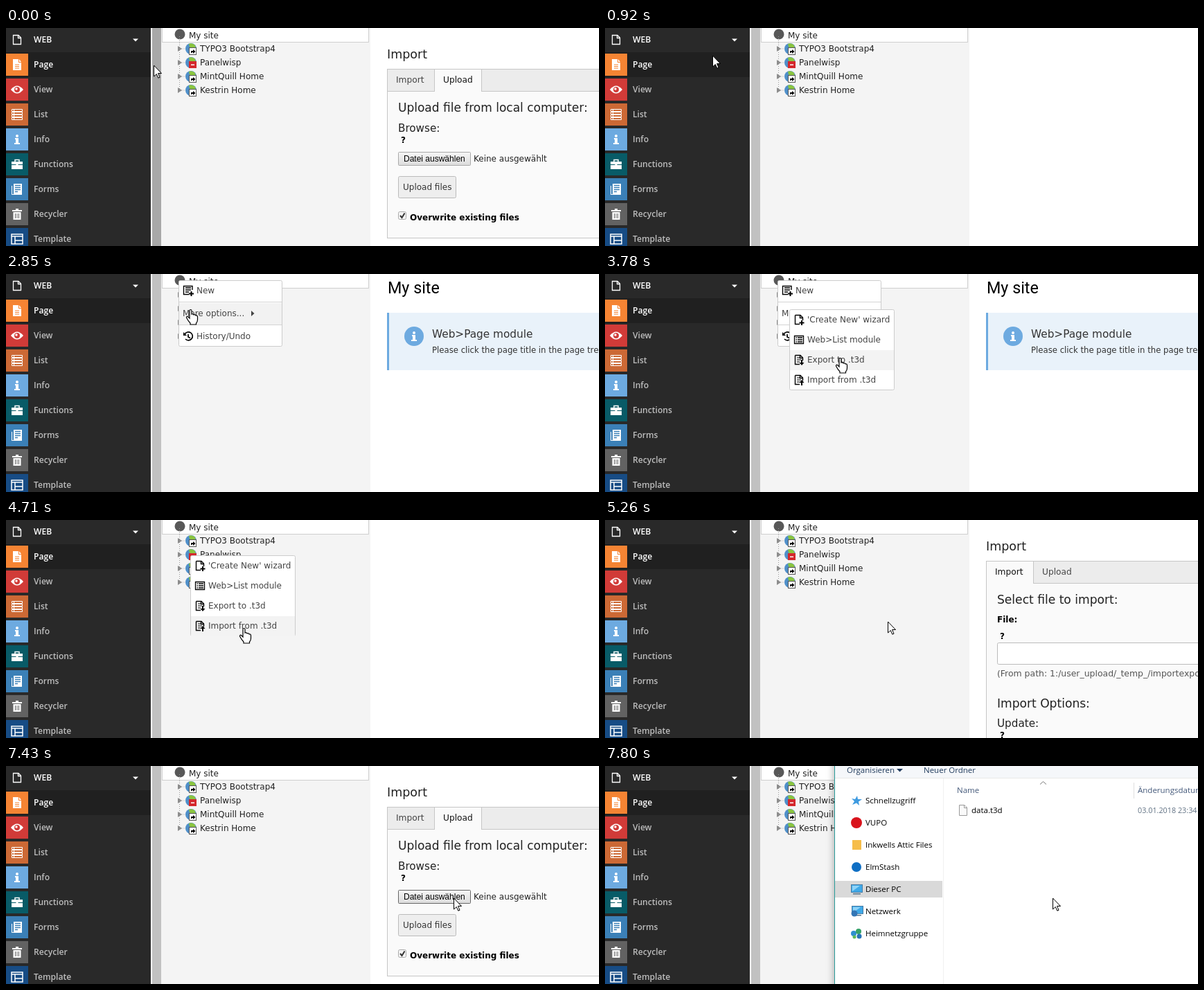
Animation, 856 px wide and 315 px high, one loop 8000 ms. Source, as an HTML page:

```html
<!DOCTYPE html>
<html lang="en">
<head>
<meta charset="utf-8">
<title>Import walkthrough</title>
<style>
  html, body { margin: 0; width: 100%; height: 100%; overflow: hidden; background: #fff; }
  svg { display: block; }
  text { white-space: pre; }
</style>
</head>
<body>
<svg id="stage" width="856" height="315" viewBox="0 0 856 315"></svg>
<script>
const LOOP = 8000;
const BODY = "'DejaVu Sans', sans-serif";
const SANS = "'Open Sans', 'Noto Sans', sans-serif";
const ARIAL = "'Liberation Sans', sans-serif";
const HEAD = "Roboto, sans-serif";

// Markup helpers; text is placed by its left edge and vertical middle.
const text = (x, cy, str, { size = 12, fill = '#222', weight = 400, font = BODY } = {}) =>
  `<text x="${x}" y="${Math.round(cy + size * 0.36)}" font-size="${size}" fill="${fill}" font-weight="${weight}" font-family="${font}">${str}</text>`;
const rect = (x, y, w, h, fill, extra = '') =>
  `<rect x="${x}" y="${y}" width="${w}" height="${h}" fill="${fill}" ${extra}/>`;
const box = (x, y, w, h, fill, stroke, r = 0) =>
  rect(x + 0.5, y + 0.5, w - 1, h - 1, fill, `stroke="${stroke}" rx="${r}"`);
const circle = (x, y, r, fill) => `<circle cx="${x}" cy="${y}" r="${r}" fill="${fill}"/>`;
const path = (d, fill = 'none', stroke = 'none', width = 1) =>
  `<path d="${d}" fill="${fill}" stroke="${stroke}" stroke-width="${width}"/>`;
const at = (x, y, content) => `<g transform="translate(${x} ${y})">${content}</g>`;
const layer = (id, content) => `<g id="${id}">${content}</g>`;

// Module menu: label, tile colour, icon drawn around its centre.
const infoGlyph = circle(0, -5, 2, '#fff') + path('M-3-2H2V5H4V7H-4V5H-2V0H-3Z', '#fff');
const modules = [
  ['Page', '#f58433', path('M-6-8H2V-3H6V8H-6ZM3-8L6-4H3Z', '#fff') + path('M-3 0H3M-3 2.5H3M-3 5H3', 'none', '#f58433')],
  ['View', '#d13b38', path('M-9 0Q0-11 9 0Q0 11-9 0Z', '#fff') + circle(0, 0, 4, '#d13b38') + circle(-1, -1, 1.7, '#fff')],
  ['List', '#cc6935', [-7.5, -3.5, 0.5, 4.5].map(y => path(`M-7.5 ${y}h15v3h-15zM-4.5 ${y}v3`, 'none', '#fff')).join('')],
  ['Info', '#6daae0', infoGlyph],
  ['Functions', '#085b67', rect(-8, -4, 16, 4, '#fff') + rect(-8, 1, 16, 6, '#fff') + path('M-3-4V-6.5H3V-4', 'none', '#fff', 1.5) + rect(-1.5, -1, 3, 3, '#fff')],
  ['Forms', '#3b80b7', path('M-5-8H7V8H-8V-5H-7V7H-5Z', '#fff') + path('M-3-5.5H5M-3-2.5H5M-3 .5H5M-3 3.5H1', 'none', '#3b80b7', 1.3)],
  ['Recycler', '#626262', path('M-7-6H-2V-8H2V-6H7V-4H-7ZM-5.5-3H5.5V8H-5.5Z', '#fff') + path('M-2.5-1V6M0-1V6M2.5-1V6', 'none', '#626262')],
  ['Template', '#174c85', path('M-8-7H8V7H-8ZM-8-4H8M-3-4V7M-3 2H8', 'none', '#fff', 1.5)],
];
const moduleLabel = (cy, str, fill) => text(40, cy, str, { size: 12.1, fill, weight: 600, font: SANS });
const sidebar = () =>
  rect(0, 0, 209, 315, '#292929') + rect(0, 35, 209, 36, '#202020') +
  path('M10.5 10.5H18L21.5 14V23.5H10.5ZM17.5 10.5V14.5H21.5', 'none', '#fff', 1.3) +
  moduleLabel(17, 'WEB', '#fff') + path('M183 15.5H191L187 19.5Z', '#fff') +
  modules.map(([label, color, icon], i) => {
    const cy = 53 + 36 * i;
    return rect(0, cy - 16, 32, 32, color) + at(16, cy, icon) + moduleLabel(cy, label, i ? '#bdbdbd' : '#fff');
  }).join('');

const treeNode = (label, i) => {
  const cy = 30 + 20 * i, hidden = i === 1;
  return `<path d="M250.5 ${cy - 18}V${cy}H260" fill="none" stroke="#999" stroke-dasharray="1 2"/>` +
    path(`M248 ${cy - 4}L254 ${cy}L248 ${cy + 4}Z`, '#8c8c8c') +
    at(267, cy, circle(0, 0, 8, '#4f8fc9') + path('M-3-7Q2-9 6-5L7 0H1L-2-3Z', '#8bc53f') +
      (hidden
        ? rect(-3, -2, 11, 10, '#d4282d') + rect(0, 2.5, 5, 1.5, '#fff')
        : box(-3, -2, 11, 11, '#fff', '#555') + path('M0 6V3H3V1L6.5 4 3 7V5H1.5V6Z', '#000'))) +
    text(280, cy, label);
};
const tree = () =>
  rect(224, 0, 302, 315, '#f4f4f4') + box(225, -1, 299, 22, '#fff', '#cfcfcf') +
  circle(251, 9, 7.5, '#585858') + text(264, 10.5, 'My site') +
  ['TYPO3 Bootstrap4', 'Panelwisp', 'MintQuill Home', 'Kestrin Home'].map(treeNode).join('');

const pageModule = () =>
  text(551, 20, 'My site', { size: 23.3, fill: '#000', font: HEAD }) +
  rect(550, 56, 306, 83, '#e9f2fa') + rect(550, 56, 3, 83, '#6daae0') +
  circle(589, 90, 14, '#6daae0') + at(589, 90, infoGlyph) +
  text(615, 86, 'Web>Page module', { size: 15.3, fill: '#333' }) +
  text(615, 110, 'Please click the page title in the page tree to edit it.', { size: 11.7, fill: '#333' });

const panel = height => box(550, 91, 330, height, '#fafafa', '#c6c6c6');
const help = cy => text(570, cy, '?', { weight: 700, fill: '#000' });
const importPanel = () =>
  panel(300) +
  text(566, 115, 'Select file to import:', { size: 17.1 }) +
  text(566, 144, 'File:', { weight: 700, fill: '#000' }) + help(168) +
  box(566, 177, 320, 32, '#fff', '#bbb', 2) +
  text(566, 222, '(From path: 1:/user_upload/_temp_/importexport/)', { size: 12.45, fill: '#555' }) +
  text(566, 265, 'Import Options:', { size: 17.1 }) +
  text(566, 294, 'Update:', { size: 15.2 }) + help(311);
const uploadPanel = () =>
  panel(213) +
  text(566, 115, 'Upload file from local computer:', { size: 17 }) +
  text(566, 145, 'Browse:', { size: 15.2 }) + help(162) +
  rect(566.5, 179.5, 104, 19, 'url(#button)', 'id="browse" stroke="#a9a9a9" rx="1"') +
  text(574, 188.5, 'Datei auswählen', { fill: '#000', font: ARIAL }) +
  text(675, 189, 'Keine ausgewählt') +
  box(566, 214, 84, 32, '#eee', '#bbb', 2) + text(573, 230, 'Upload files', { fill: '#333' }) +
  box(566, 265, 12, 12, '#f4f4f4', '#aaa', 2) + path('M569 271L571.5 274L575.5 267.5', 'none', '#333', 2) +
  text(583, 273.5, 'Overwrite existing files', { weight: 700, fill: '#000' });

// One grey strip, with the active tab open towards the panel.
const tabs = active =>
  box(550, 59, 330, 33, '#ececec', '#c6c6c6') +
  ['Import', 'Upload'].map((label, i) => {
    const x = 550 + 68 * i, on = i === active;
    return (on ? box(x, 59, 69, 33, '#fafafa', '#c6c6c6') + rect(x + 1, 91, 67, 2, '#fafafa') : '') +
      text(x + 13, 75, label, { size: 12.2, fill: on ? '#111' : '#444' });
  }).join('');

// Context menus
const sheet = (plus, extra = '') =>
  path('M-5.5-6.5H2L5.5-3V1M-5.5-6.5V6.5H1M1.5-6V-2.5H5', 'none', '#000', 1.4) + path(plus, 'none', '#000', 2) + extra;
const sheetLines = path('M-3-3H1M-3 0H3M-3 3H1', 'none', '#000');
const menuLabel = (x, cy, label) => text(x, cy, label, { fill: '#444' });
const mainMenu = () =>
  box(249, 9, 150, 96, '#fff', '#ccc', 2) +
  rect(250, 0, 148, 31, '#f2f2f2', 'id="mainHover"') +
  path('M250 40.5H398M250 73.5H398', 'none', '#d4d4d4') +
  at(263, 24, path('M6-1V-6.5H-6.5V5.5H1', 'none', '#000', 1.4) + path('M-4-4H4M-4-1H4M-4 2H1', 'none', '#000', 1.4) + path('M4.5 1V8M1 4.5H8', 'none', '#000', 2)) +
  menuLabel(275, 24, 'New') + menuLabel(255, 57, 'More options...') +
  path('M354 53L358.5 57L354 61Z', '#444') +
  at(263, 90, path('M-5-3A6 6 0 1 1-4 4M0-3V1L3 2.5', 'none', '#000', 1.7) + path('M-7-6V-1H-2Z', '#000')) +
  menuLabel(275, 90, 'History/Undo');
const subItems = [
  ["'Create New' wizard", sheet('M4 1V8M.5 4.5H7.5')],
  ['Web>List module', path('M-6.5-5.5H6.5V5.5H-6.5Z', 'none', '#000', 1.3) + path('M-4.5-3H-3M-2-3H5M-4.5 0H-3M-2 0H5M-4.5 3H-3M-2 3H5', 'none', '#000', 1.5)],
  ['Export to .t3d', sheet('M4 0V5', sheetLines + path('M.5 4H7.5L4 8Z', '#000'))],
  ['Import from .t3d', sheet('M4 3V8', sheetLines + path('M.5 4H7.5L4 0Z', '#000'))],
];
const subMenu = () =>
  box(266, 51, 152, 117, '#fff', '#ccc', 2) + rect(267, 0, 150, 29, '#f3f3f3', 'id="subHover"') +
  subItems.map(([label, icon], i) => at(280, 66 + 29 * i, icon) + menuLabel(292, 66 + 29 * i, label)).join('');

const tooltip = () =>
  rect(265, -5, 46, 28, '#333', 'rx="3"') + path('M260 10L265 5V15Z', '#333') +
  text(275, 10, 'id=0', { size: 10, fill: '#fff', weight: 700 });

// File dialog
const monitor = box(-8, -7, 17, 12, '#3fa9e8', '#4b7da5') + path('M-6-5H5L-6 3Z', '#8fd3f7') + rect(-5, 6, 11, 1.5, '#56738a');
const places = [
  ['Schnellzugriff', path('M1-7L2-2 8-2 3 1.5 4 7 0 3.5-6 6-3 1-7-3-2-2Z', '#3f9be0')],
  ['VUPO', circle(0, 0, 8, '#d9131c')],
  ['Inkwells Attic Files', rect(-6, -7, 13, 14, '#f6bd4a')],
  ['ElmStash', circle(0, 0, 7, '#0f6fc4')],
  ['Dieser PC', monitor],
  ['Netzwerk', at(1, -1, monitor) + circle(-3, 3, 4.5, '#3476b5')],
  ['Heimnetzgruppe', circle(-4, 0, 4, '#2e8fd0') + circle(3, -3, 4, '#36a36a') + circle(4, 4, 3.5, '#2674b8') + circle(-3, 5, 2.5, '#5cb85c')],
];
const dialog = () => {
  const label = (x, cy, str, fill, size = 11.5) => text(x, cy, str, { size, fill, font: SANS });
  return rect(331, -60, 620, 460, '#fff', 'filter="url(#shadow)"') +
    rect(332, -60, 600, 77, '#f5f7fa') +
    path('M331.5-60V400', 'none', '#2a9d9b') + path('M332 17.5H900', 'none', '#e8e8e8') +
    path('M488.5 18V400', 'none', '#f0f0f0') +
    label(349, 6, 'Organisieren', '#1e395b') + path('M421 4H430L425.5 8.5Z', '#1e395b') +
    label(460, 6, 'Neuer Ordner', '#1e395b') +
    rect(332, 166, 155, 24, '#d9d9d9') +
    places.map(([name, icon], i) => at(363, 50 + 32 * i, icon) + label(376, 50 + 32 * i, name, '#000')).join('') +
    label(508, 35, 'Name', '#44597a') + path('M628 26.5L632.5 22.5L637 26.5', 'none', '#777') +
    path('M763.5 24V47', 'none', '#dedede') + label(769, 35, 'Änderungsdatum', '#44597a') +
    path('M511.5 56.5H519L522.5 60V71.5H511.5ZM518.5 56.5V60.5H522.5', '#fafafa', '#999') +
    label(529, 64, 'data.t3d', '#000') + label(769, 64, '03.01.2018 23:34', '#5f7082', 10.8);
};

const stage = document.getElementById('stage');
stage.innerHTML = `<defs>
  <linearGradient id="button" x2="0" y2="1"><stop stop-color="#f6f6f6"/><stop offset="1" stop-color="#dcdcdc"/></linearGradient>
  <filter id="shadow"><feDropShadow dx="0" dy="2" stdDeviation="6" flood-opacity=".35"/></filter>
  </defs>` +
  rect(0, 0, 856, 315, '#fff') + sidebar() +
  rect(211, 0, 13, 315, '#c1c1c1', 'id="scrollbar"') + tree() +
  layer('pageModule', pageModule()) +
  layer('importTitle', text(550, 38, 'Import', { size: 17.5 })) +
  layer('importPanel', importPanel()) + layer('uploadPanel', uploadPanel()) +
  layer('importTabs', tabs(0)) + layer('uploadTabs', tabs(1)) +
  layer('tooltip', tooltip()) + layer('mainMenu', mainMenu()) + layer('subMenu', subMenu()) +
  layer('dialog', dialog()) +
  layer('cursor',
    layer('arrow', path('M-.5 0V16L3.3 12.5 5.8 18.2 8 17.3 5.6 11.5H10.5Z', '#fff', '#000')) +
    layer('hand', path('M-1 2Q-1 .5 .5 .5T2 2V7Q4 6 5 8Q7 7 8 9Q10.5 8.5 10.5 11V15Q10.5 18 8.5 20V22H0V20Q-3 17-5.5 12Q-5.5 9.5-3.5 10.5L-1 13Z', '#fff', '#000', 1.2)));

const el = id => document.getElementById(id);
const show = (id, on) => { el(id).style.display = on ? '' : 'none'; };
const smooth = p => p * p * (3 - 2 * p);
// Screen captures arrive in discrete steps, so motion does too.
const stepped = (t, from, to, n) =>
  t < from ? 0 : Math.min(n, Math.floor((t - from) / (to - from) * (n - 1) + 0.15) + 1) / n;

// Cursor moves: start, end, steps, destination, optional bend point.
const moves = [
  [150, 460, 5, [147, 43]],
  [840, 1610, 11, [249, 9]],
  [2160, 2850, 10, [266, 51]],
  [3320, 4010, 10, [343, 156], [342, 66]],
  [5110, 5800, 10, [661, 67], [494, 141]],
  [6490, 7030, 8, [647, 191]],
];
const handTimes = [[230, 690], [1530, 5110], [5720, 6490]];

function cursorAt(t) {
  let pos = [214, 54];
  for (const [from, to, n, end, bend] of moves) {
    if (t < from) break;
    const e = smooth(stepped(t, from, to, n));
    pos = pos.map((a, i) => {
      const mid = bend ? bend[i] : (a + end[i]) / 2;
      return (1 - e) ** 2 * a + 2 * e * (1 - e) * mid + e * e * end[i];
    });
  }
  return pos.map(Math.round);
}

function draw(t) {
  const within = (a, b) => t >= a && t < b;
  const [x, y] = cursorAt(t);
  const hand = handTimes.some(([a, b]) => within(a, b));
  el('cursor').setAttribute('transform', `translate(${x} ${y})`);
  show('hand', hand);
  show('arrow', !hand);
  el('scrollbar').setAttribute('fill', x > 209 && x < 225 ? '#a8a8a8' : '#c1c1c1');

  const uploadStart = t < 920;
  show('pageModule', within(1080, 4710));
  show('importTitle', uploadStart || t >= 4880);
  show('importPanel', within(4880, 6340));
  show('uploadPanel', uploadStart || t >= 6340);
  show('importTabs', within(4880, 6490));
  show('uploadTabs', uploadStart || t >= 6490);

  show('tooltip', within(1610, 2160));
  show('mainMenu', within(2160, 4410));
  show('subMenu', within(3170, 4880));
  show('mainHover', t < 3170 && y > 9);
  el('mainHover').setAttribute('y', y < 41 ? 10 : 42);
  show('subHover', t >= 3320);
  el('subHover').setAttribute('y', 52 + 29 * Math.max(0, Math.min(3, Math.floor((y - 52) / 29))));

  const pressed = within(7350, 7430);
  el('browse').setAttribute('fill', pressed ? '#d6d6d6' : 'url(#button)');
  el('browse').setAttribute('stroke', t >= 7030 ? '#666' : '#a9a9a9');

  const open = stepped(t, 7580, 7800, 4), scale = 0.92 + 0.08 * open;
  show('dialog', open > 0);
  el('dialog').setAttribute('opacity', open);
  el('dialog').setAttribute('transform', `translate(640 150) scale(${scale}) translate(-640 -150)`);
}

const start = performance.now();
function tick() {
  draw((performance.now() - start) % LOOP);
  requestAnimationFrame(tick);
}
tick();
</script>
</body>
</html>
```
